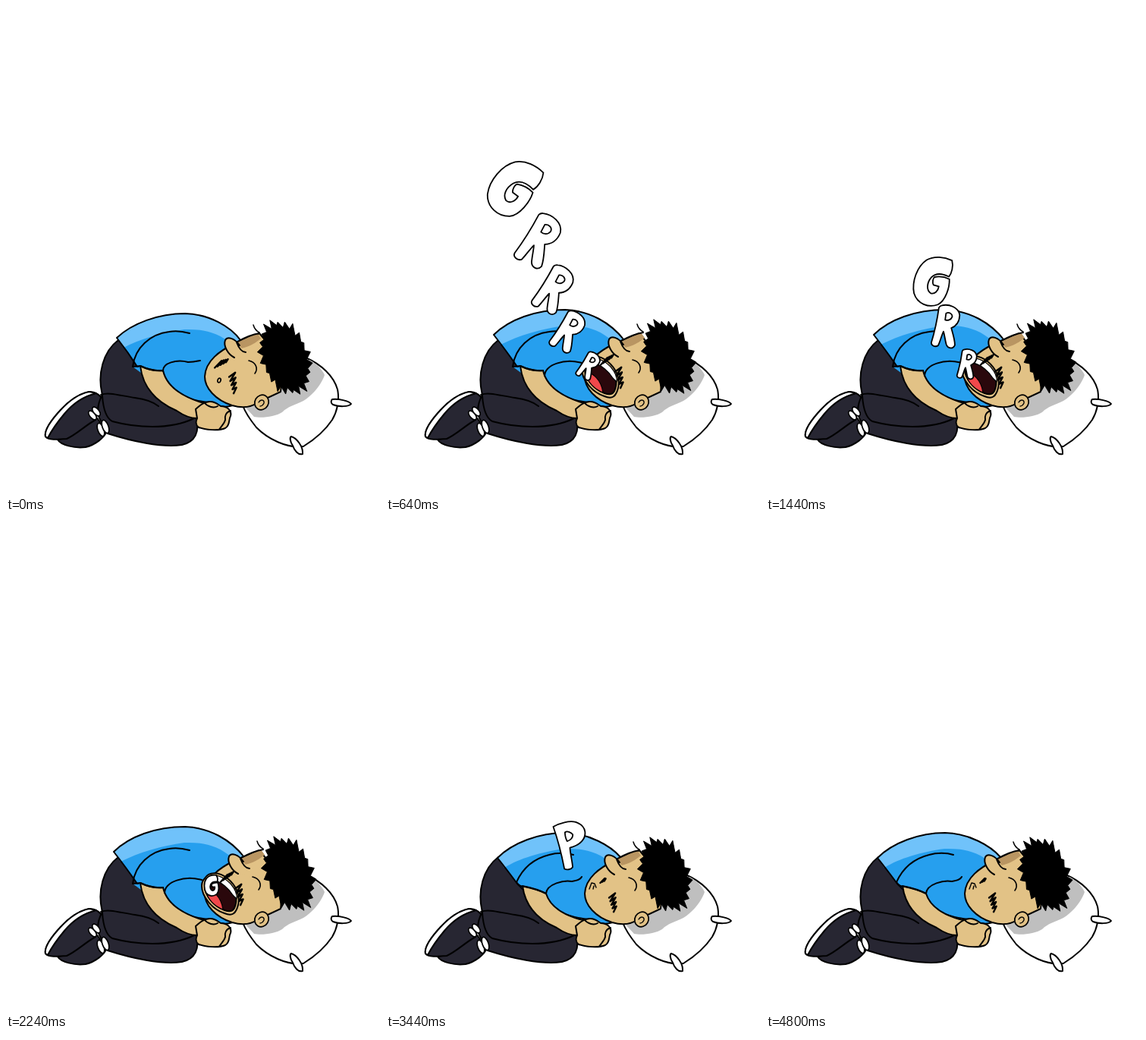
Recreate the animation shown at these times as an HTML page. Size 493 by 644 pixels, loop 5.04 s.

```html
<!DOCTYPE html>
<html lang="en">
<head>
<meta charset="utf-8">
<title>Snoring sleeper</title>
<style>
html, body { margin: 0; height: 100%; overflow: hidden; background: #fff; }
svg { display: block; width: 100%; height: 100%; }
path, ellipse { stroke-linecap: round; stroke-linejoin: round; vector-effect: non-scaling-stroke; }
</style>
</head>
<body>
<svg id="stage" viewBox="0 0 493 644"></svg>
<script>
const LOOP = 5040, INHALE = 240, EXHALE = 2400;
const NAVY = '#272632', BLUE = '#269fee', SKY = '#70c2fa', SKIN = '#e2c286';

const shape = (d, fill = 'none', width = 2) =>
  `<path d="${d}" fill="${fill}" ${width ? `stroke="#000" stroke-width="${width}"` : ''}/>`;
const oval = (x, y, rx, ry, turn, fill = '#fff') =>
  `<ellipse cx="${x}" cy="${y}" rx="${rx}" ry="${ry}" transform="rotate(${turn} ${x} ${y})" fill="${fill}" stroke="#000" stroke-width="1.7"/>`;
const shift = (x, y, content) => `<g transform="translate(${x} ${y})">${content}</g>`;
const clamp = v => Math.max(0, Math.min(1, v));

// Glyph outlines are centred on the origin; size is their natural height.
const GLYPHS = {
  G: { size: 64, d: 'M21-30C24-23 23-14 20-9C11-12 3-12-2-5C-7 3-6 12 0 15C5 16 9 11 9 5L2 4C0 1 0-4 2-6C8-8 15-8 21-6C23 4 20 22 11 28C0 34-15 31-21 18C-26 4-22-16-11-26C-2-33 11-33 21-30Z' },
  R: { size: 66, d: 'M-12-31C-2-35 14-32 17-20C18-10 14-3 7 1C10 8 15 18 16 26C14 33 6 33 3 27C0 20-2 12-4 8C-6 14-7 24-9 30C-13 34-20 32-20 27C-17 8-16-14-16-27Q-15-30-12-31ZM-4-20C0-23 6-21 6-16C5-11 0-9-4-10Z' },
  P: { size: 145, d: 'M-41-70C-18-75 12-73 30-62C44-51 50-37 48-25C44-3 22 10-12 8C-17 25-19 55-23 68C-30 74-44 71-49 65C-44 25-40-25-41-70ZM-12-42C-4-45 6-37 9-28C7-19-3-13-14-14C-16-23-14-35-12-42Z' },
  S: { size: 73, d: 'M40-24C35-35 15-39-3-35C-19-31-25-21-18-13C-9-5 11-2 16 7C17 17 9 23-1 21C-15 18-25 8-34 6C-41 7-43 14-40 20C-32 30-15 37 5 36C21 35 32 27 32 16C30 2 15-7 7-15C13-23 25-16 31-15C37-15 41-19 40-24Z' }
};

function glyph(name, [x, y], height, turn) {
  const { size, d } = GLYPHS[name];
  return `<g transform="translate(${x} ${y}) rotate(${turn}) scale(${height / size})">${shape(d, '#fff', 1.8)}</g>`;
}

const bezier = (u, ...points) => [0, 1].map(k =>
  points.reduce((sum, p, i) => sum + p[k] * [1, 3, 3, 1][i] * u ** i * (1 - u) ** (3 - i), 0));

// Letters queue along a curve into the mouth, shrinking on the way.
function inhaled(t) {
  const p = (t - 400) / 1840;
  return [...'GRRRR'].map((name, i) => {
    const u = p + (0.27 * i - 0.012 * i * i) * (1 - 0.3 * p);
    if (u > 1.01) return '';
    const place = bezier(Math.max(u, 0), [136, 206], [230, 290], [205, 400], [271, 478]);
    return glyph(name, place, 27 + 55 * (1 - Math.min(u, 1)) ** 0.4, 34 - 46 * p);
  }).reverse().join('');
}

// Letters leave the lips one after another and grow while rising.
function exhaled(t) {
  const p = clamp((t - 2800) / 1600);
  const lead = (p * p * (3 - 2 * p)) ** 1.6;
  return [...'PSSSS'].map((name, i) => {
    const u = lead - 0.21 * i;
    if (u < 0) return '';
    const place = bezier(u, [266, 466], [252, 400], [110, 270], [104, 203]);
    const height = 23 + 132 * Math.sin(u * Math.PI / 2);
    return glyph(name, place, height * (name === 'S' ? 0.58 : 1), -42 * (1 - u) ** 4);
  }).join('');
}

const pillow =
  shape('M397 464C415 472 432 487 437 505C440 520 436 535 430 545C420 560 405 572 392 580C370 583 345 570 330 555C322 545 316 537 312 526L340 480Z', '#fff') +
  shape('M330 520L400 466C410 471 417 479 420 486C416 498 405 512 392 520C380 526 372 527 364 535C355 541 337 543 327 541L314 527Z', '#bfbfbf', 0) +
  shape('M376 567C383 569 392 580 391 590C385 592 380 585 378 579C374 573 374 568 376 567Z', '#fff') +
  shape('M430 518C438 517 452 520 455 524C452 528 438 528 431 525C428 523 428 520 430 518Z', '#fff');

const legs =
  shape('M68 571C72 578 90 583 105 581C118 578 130 568 133 560L118 540C105 548 85 570 68 571Z', NAVY) +
  shape('M52 567C50 558 60 545 72 532C84 519 98 510 110 508C116 508 122 511 126 516L118 545C105 552 92 565 80 570C68 571 55 572 52 567Z', NAVY) +
  shape('M52 567C50 558 60 545 72 532C84 519 98 510 110 508L119 510C102 514 87 525 77 537C67 549 59 561 55 569Z', '#fff') +
  shape('M148 440C128 455 120 485 127 512C120 525 118 540 128 550L134 563C165 573 205 582 232 578C250 574 255 560 251 544L225 515L190 465Z', NAVY) +
  shape('M125 512C135 508 150 513 170 516C185 518 195 522 201 527M127 514C128 528 131 542 140 547C170 555 215 559 248 543') +
  [0, 1].map(i => oval(114 + 5 * i, 539 - 5 * i, 3.6, 7, -40) + oval(125 + 6 * i, 558 - 4 * i, 4, 9, -20)).join('');

const fist =
  shape('M252 543C250 547 250 552 254 555C262 558 280 560 289 556C296 552 293 545 296 540C298 533 292 527 283 527C278 524 275 520 268 521C260 522 254 527 250 531Z', SKIN) +
  shape('M262 523C266 528 274 530 279 527M296 533C290 535 288 540 289 545C288 550 283 554 281 558');

// A tilted ellipse whose rim alternates between valleys and swept, uneven tips.
function spikyHair(count) {
  const rim = Array.from({ length: count * 2 }, (_, i) => {
    const tip = i % 2;
    const angle = (i - 0.45 * tip) * Math.PI / count;
    const reach = tip ? 1.2 + 0.08 * Math.sin(i * 2.3) : 1 + 0.03 * Math.sin(i * 1.7);
    return `${27 * reach * Math.cos(angle)} ${43 * reach * Math.sin(angle)}`;
  });
  return `<g transform="translate(368 463) rotate(-20)">${shape(`M${rim.join('L')}Z`, '#000', 1)}</g>`;
}

const hair = spikyHair(22) + shape('M326 420Q328 427 334 430', 'none', 1.5);

const faceTop =
  shape('M303 444L331 431L336 438C325 447 316 450 309 451Z', '#b99562', 0) +
  shape('M305 442C314 437 322 433 334 431') +
  shape('M307 446C300 437 292 435 289 440C286 448 294 460 302 465C309 466 315 459 313 454Z', SKIN, 0) +
  shape('M308 447C301 437 292 435 289 440C286 448 293 459 301 463M304 443C307 451 311 456 316 456') +
  shape('M320 467C329 469 333 477 328 484', 'none', 1.6);

// Diagonal pen strokes between two points, tapering toward the second.
function scribble(x0, y0, x1, y1, strokes = 9, length = 6) {
  const points = Array.from({ length: strokes }, (_, i) => {
    const p = i / (strokes - 1), swing = (i % 2 ? 1 : -1) * length * (1 - p / 2);
    return `${x0 + (x1 - x0) * p + swing * 0.65} ${y0 + (y1 - y0) * p - swing * 0.75}`;
  });
  return shape(`M${points.join('L')}`, 'none', 2.4);
}

const MOUTHS = {
  small: scribble(279, 472, 292, 467) + scribble(298, 484, 302, 508) + oval(281, 493, 2, 3, 20, SKIN),
  pursed: scribble(285, 471, 289, 470, 5, 4) + scribble(298, 489, 302, 510) +
    shape('M268 482L271 474L275 475L277 480M273 482L274 478', 'none', 1.4),
  open: shape('M262 468C268 458 282 460 292 468C303 477 309 490 306 503C303 515 298 518 288 514C272 509 258 492 258 478C258 473 260 470 262 468Z', SKIN) +
    shape('M263 471C269 462 281 464 290 471C300 479 305 491 303 501C301 511 297 513 288 510C275 505 262 491 262 479Z', '#2a080c') +
    shape('M263 484C272 481 284 493 286 509C275 505 266 496 263 484Z', '#f0484b', 1.2) +
    shape('M267 466C274 460 288 467 296 475C302 482 305 489 304 495L299 490C294 482 284 472 272 470Z', '#fff', 1.3) +
    scribble(287, 468, 299, 461) + scribble(306, 477, 311, 501)
};

const POSES = {
  rest: { hem: [146, 437], top: 405, head: 0, low: false },
  inhale: { hem: [142, 433], top: 400, head: 5, low: false },
  exhale: { hem: [147, 441], top: 408, head: 0, low: true }
};

function torso({ hem: [x, y], top, head, low }) {
  const back = `M${x} ${y}C${x + 20} ${top + 13} ${x + 55} ${top} 236 ${top}C268 ${top + 1} 296 ${top + 17} ${309 + head} 440`;
  const body = `${back}L300 470L305 522C295 531 280 528 268 522C240 520 205 505 180 482L173 475Q${x + 15} ${y + 19} ${x} ${y}Z`;
  const sleeve = low
    ? 'M172 473C180 455 195 442 215 437C225 434 238 434 247 437M172 473Q176 479 183 479Q198 482 211 488'
    : 'M167 475C170 450 190 432 215 429C225 427 235 429 242 431M167 475L177 474C188 479 198 481 207 480';
  const chest = head ? 'M209 487C210 472 235 464 258 470'
    : low ? 'M211 488C212 475 235 470 245 472C253 471 257 468 258 466'
    : 'M207 481C206 470 225 465 240 469C249 469 255 467 256 467';
  return shape(body, BLUE, 0) +
    shape(`${back}L298 ${top + 41}C280 ${top + 25} 260 ${top + 20} 235 ${top + 21}C205 ${top + 25} 175 ${top + 34} ${x + 9} ${y + 13}Z`, SKY, 0) +
    shape(body) +
    shape(low ? 'M172 473L211 488L230 500L200 496Z' : 'M167 475L207 480L225 500L190 492Z', BLUE, 0) +
    shape(low
      ? 'M180 478C183 501 197 521 225 533C235 540 245 543 252 543L264 524C240 519 217 508 211 488C200 482 190 480 180 478Z'
      : 'M177 474C180 500 195 520 225 533C235 540 245 543 252 543L264 524C235 516 212 503 207 480C195 481 185 478 177 474Z', SKIN) +
    shape(sleeve + chest);
}

function sleeper(pose, mouth) {
  const face = 'M302 444C282 454 263 467 262 488C262 503 276 519 298 526C312 530 324 528 332 522L362 508L366 470L334 431Z';
  return pillow + legs + torso(pose) + shape(face, SKIN) +
    shift(pose.head, -pose.head / 5, faceTop + hair) +
    oval(337, 522, 9, 10, 30, SKIN) + shape('M333 522C336 517 341 519 340 523Q338 527 335 527', 'none', 1.4) +
    fist + MOUTHS[mouth];
}

function scene(t) {
  if (t < INHALE) return sleeper(POSES.rest, 'small');
  if (t < EXHALE) return sleeper(POSES.inhale, 'open') + inhaled(t);
  return sleeper(POSES.exhale, 'pursed') + (t >= 2800 && t < 4800 ? exhaled(t) : '');
}

const stage = document.getElementById('stage');
const start = performance.now();
let shown;

function frame() {
  const now = (performance.now() - start) % LOOP;
  // Poses are held for 240 ms and 160 ms in turn.
  const step = Math.floor(now / 400) * 400 + (now % 400 < 240 ? 0 : 240);
  if (step !== shown) stage.innerHTML = scene(shown = step);
  requestAnimationFrame(frame);
}
frame();
</script>
</body>
</html>
```
